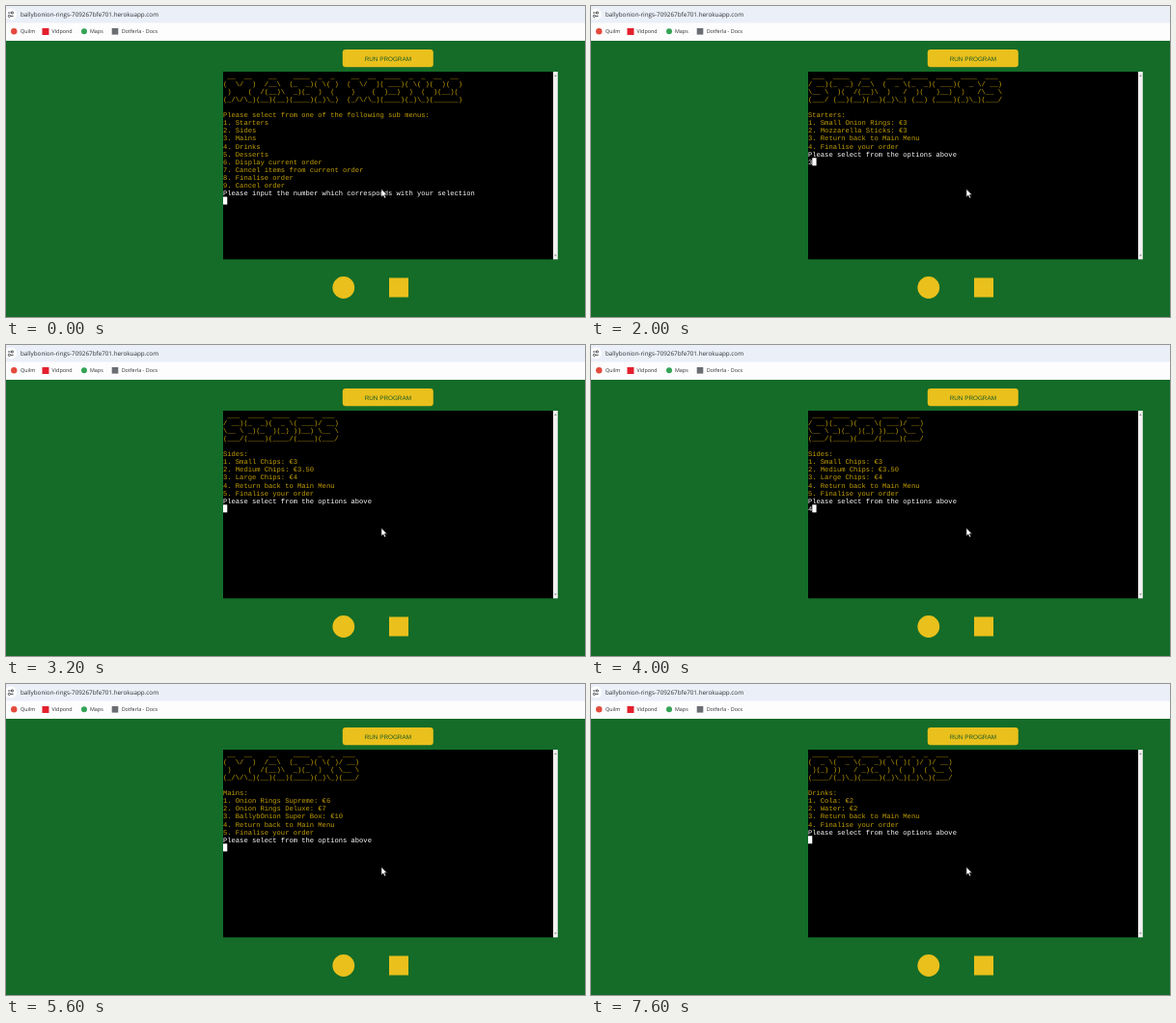
An HTML page for the animation above (8 s loop, 600 px wide and 322 px high).

```html
<!DOCTYPE html>
<html lang="en">
<head>
<meta charset="utf-8">
<title>Terminal menu</title>
<style>
  html, body { margin: 0; width: 100%; height: 100%; overflow: hidden; }
  svg { display: block; width: 600px; height: 322px; text-rendering: geometricPrecision; }
  .ui { font-family: "Open Sans", "Noto Sans", sans-serif; fill: #2b2d31; }
  .marks { font-size: 5.4px; }
  #terminal text { font: 7.13px "Liberation Mono", "Courier New", monospace; white-space: pre; }
</style>
</head>
<body>
<svg viewBox="0 0 600 322" xmlns="http://www.w3.org/2000/svg">
  <rect width="600" height="322" fill="#146c28"/>
  <rect width="600" height="18" fill="#ebeff8"/>
  <rect y="17.5" width="600" height="18.5" fill="#fdfdfe"/>

  <circle cx="5" cy="8.5" r="6" fill="#fff"/>
  <g fill="none" stroke="#33363b" stroke-width="0.9">
    <path d="M2 7H4.6M7.6 10.4H5"/>
    <circle cx="6.4" cy="7" r="1.1"/>
    <circle cx="3.4" cy="10.4" r="1.1"/>
  </g>
  <text class="ui" x="15" y="10.9" font-size="6.3">ballybonion-rings-709267bfe701.herokuapp.com</text>

  <g class="ui marks">
    <circle cx="8.3" cy="26.3" r="3.2" fill="#e34a3c"/>
    <text x="15" y="28.2">Quilm</text>
    <rect x="37.5" y="23" width="7" height="7" fill="#e3202c"/>
    <text x="47.5" y="28.2">Vidpond</text>
    <circle cx="81" cy="26.3" r="3" fill="#35a356"/>
    <text x="87" y="28.2">Maps</text>
    <rect x="109.7" y="23" width="6.6" height="6.6" fill="#6a6d72"/>
    <text x="119.7" y="28.2">Dotferla - Docs</text>
  </g>

  <rect x="348.8" y="45" width="94" height="18.2" rx="3.2" fill="#e9c01c"/>
  <text x="395.8" y="56.5" text-anchor="middle" font-size="6.35" fill="#1d5a26"
        font-family="Liberation Sans, Arial, sans-serif">RUN PROGRAM</text>

  <rect x="225" y="68" width="342" height="194.3" fill="#000"/>
  <rect x="567" y="68" width="4.8" height="194.3" fill="#f1f1f1"/>
  <path d="M568 73l1.4-1.8 1.4 1.8zM568 257.4l1.4 1.8 1.4-1.8z" fill="#8a8a8a"/>
  <g id="terminal"></g>

  <circle cx="349.8" cy="291.5" r="11.4" fill="#e9c01c"/>
  <rect x="397" y="281.5" width="20" height="20" fill="#e9c01c"/>

  <path d="M389 189.6v8.1l1.9-1.7 1.3 2.9 1.4-.6-1.3-2.8h2.5z"
        fill="#fff" stroke="#111" stroke-width="0.5"/>
</svg>
<script>
const LEFT = 225, TOP = 68.7, COLUMN = 4.279, ROW = 8.05;
const GOLD = '#c4a000', WHITE = '#fff';
const LOOP = 8000;

// Four-row banner letters, rows separated by "|".
const GLYPHS = {
  A: String.raw`   __   |  /__\  | /(__)\ |(__)(__)`,
  D: String.raw` ____  |(  _ \ | )(_) )|(____/ `,
  E: String.raw` ____ |( ___)| )__) |(____)`,
  I: String.raw` ____ |(_  _)| _)(_ |(____)`,
  K: String.raw` _  _ |( )/ )| )  ( |(_)\_)`,
  M: String.raw` __  __ |(  \/  )| )    ( |(_/\/\_)`,
  N: String.raw` _  _ |( \( )| )  ( |(_)\_)`,
  R: String.raw` ____ |(  _ \| )   /|(_)\_)`,
  S: String.raw` ___ |/ __)|\__ \|(___/`,
  T: String.raw` ____ |(_  _)|  )(  | (__) `,
  U: String.raw` __  __ |(  )(  )| )(__)( |(______)`
};

// Pull the next letter left until the two touch in some row.
function joinKerned(left, right) {
  const gaps = left.map((row, i) =>
    row.length - row.trimEnd().length + right[i].length - right[i].trimStart().length);
  const gap = Math.min(...gaps);
  return left.map((row, i) => {
    const spare = row.length - row.trimEnd().length;
    const cut = Math.min(gap, spare);
    return row.slice(0, row.length - cut) + right[i].slice(gap - cut);
  });
}

function banner(title) {
  const words = title.split(' ').map(word =>
    [...word].map(letter => GLYPHS[letter].split('|')).reduce(joinKerned));
  return words.reduce((a, b) => a.map((row, i) => row + '  ' + b[i]));
}

function screen(title, heading, items, prompt) {
  const numbered = items.map((item, i) => `${i + 1}. ${item}`);
  return { lines: [...banner(title), '', heading, ...numbered], prompt };
}

function subMenu(name, items) {
  return screen(name.toUpperCase(), name + ':',
    [...items, 'Return back to Main Menu', 'Finalise your order'],
    'Please select from the options above');
}

const main = screen('MAIN MENU', 'Please select from one of the following sub menus:',
  ['Starters', 'Sides', 'Mains', 'Drinks', 'Desserts', 'Display current order',
   'Cancel items from current order', 'Finalise order', 'Cancel order'],
  'Please input the number which corresponds with your selection');
const starters = subMenu('Starters', ['Small Onion Rings: €3', 'Mozzarella Sticks: €3']);
const sides = subMenu('Sides', ['Small Chips: €3', 'Medium Chips: €3.50', 'Large Chips: €4']);
const mains = subMenu('Mains',
  ['Onion Rings Supreme: €6', 'Onion Rings Deluxe: €7', 'BallybOnion Super Box: €10']);
const drinks = subMenu('Drinks', ['Cola: €2', 'Water: €2']);

// Start time, screen, typed input.
const timeline = [
  [0, main, ''], [300, main, '1'],
  [600, starters, ''], [1900, starters, '3'],
  [2400, main, ''], [2900, main, '2'],
  [3200, sides, ''], [4000, sides, '4'],
  [4800, main, ''], [5300, main, '3'],
  [5600, mains, ''], [6300, mains, '4'],
  [6600, main, ''], [7000, main, '4'],
  [7500, drinks, '']
];

const terminal = document.getElementById('terminal');

function add(tag, attributes, content = '') {
  const node = document.createElementNS('http://www.w3.org/2000/svg', tag);
  for (const [key, value] of Object.entries(attributes)) node.setAttribute(key, value);
  node.textContent = content;
  terminal.append(node);
}

function addLine(content, row, fill) {
  add('text', { x: LEFT, y: TOP + row * ROW + 6.35, fill }, content);
}

function draw([, { lines, prompt }, input]) {
  terminal.replaceChildren();
  lines.forEach((line, row) => addLine(line, row, GOLD));
  const row = lines.length;
  addLine(prompt, row, WHITE);
  addLine(input, row + 1, WHITE);
  add('rect', {
    x: LEFT + input.length * COLUMN, y: TOP + (row + 1) * ROW,
    width: COLUMN, height: ROW, fill: WHITE
  });
}

let shown;
function render(now) {
  const time = now % LOOP;
  const state = timeline.findLast(([start]) => start <= time);
  if (state !== shown) draw(shown = state);
}

const begin = performance.now();
function tick() {
  render(performance.now() - begin);
  requestAnimationFrame(tick);
}
tick();
</script>
</body>
</html>
```
